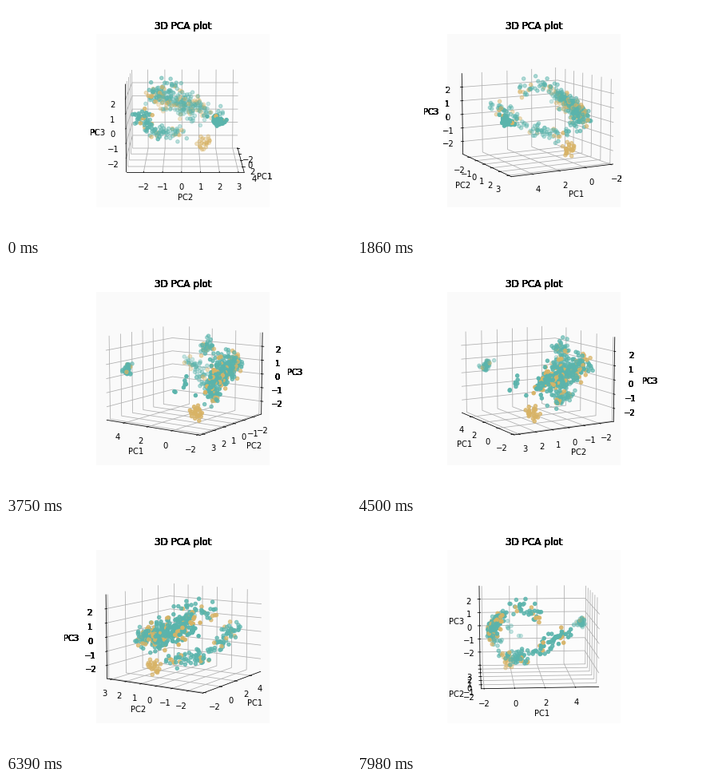
A matplotlib script that plays this animation: 432x288 px, repeating every 8000 ms.

```python
import matplotlib.pyplot as plt
import numpy as np
from matplotlib.animation import FuncAnimation
from matplotlib.artist import Artist
from matplotlib.transforms import Bbox

FRAMES, LOOP = 267, 8000
TEAL, TAN = "#5ab4ac", "#d8b365"
rng = np.random.default_rng(7)
points, colors = [], []


def sweep(n, path, spread, tan):
    """Scatter n points around path(t), a share of them tan."""
    t = rng.random(n)
    centre = np.column_stack([np.broadcast_to(c, n) for c in path(t)])
    points.append(centre + rng.normal(0, 1, (n, 3)) * spread)
    colors.extend(np.where(rng.random(n) < tan, TAN, TEAL))


def shell(t):
    """Curved sheet at the low end of PC1."""
    y = 2.9 * t - 1.5 + rng.normal(0, 0.35, t.size)
    z = 0.55 - 0.35 * y + rng.normal(0, 0.45, t.size)
    x = 0.33 * (z - 0.2) ** 2 - 1.62 + np.abs(rng.normal(0, 0.25, t.size))
    return x, y, z


def lower_arc(t):
    return 3.4 - 4.1 * t, 2.3 * t ** 2 - 2.2, 0.6 - 2.1 * np.sin(1.6 * t)


def upper_arc(t):
    return 1.9 - 2 * t, 1.6 * t - 1.8, 1.4 + 0.8 * np.sin(2 * t)


sweep(280, shell, 0.05, 0.24)
sweep(110, lower_arc, 0.25, 0.13)
sweep(38, upper_arc, 0.25, 0.25)
sweep(48, lambda t: (5.1 - 0.5 * t ** 6, 1.65 + 0.5 * t, 0.75 - 0.55 * t), 0.12, 0.06)
sweep(24, lambda t: (-0.2, 1.3, 0.4 * t - 2.3), 0.22, 1)
sweep(8, lambda t: (0.75 - 1.5 * t, 2.35, 1.7 * t - 0.9), 0.15, 0)

fig = plt.figure(figsize=(6, 4), dpi=72, facecolor="white")
fig.subplots_adjust(left=0.125, right=0.9, bottom=0.125, top=0.88)
ax = fig.add_subplot(projection="3d")
ax.scatter(*np.vstack(points).T, c=colors, s=20)
ax.set(title="3D PCA plot", xlabel="PC1", ylabel="PC2", zlabel="PC3",
       xlim=(-2.18, 5.54), ylim=(-2.92, 3.30), zlim=(-2.95, 2.98),
       xticks=range(-2, 5, 2), yticks=range(-2, 4), zticks=range(-2, 3))
axes3 = (ax.xaxis, ax.yaxis, ax.zaxis)
for axis in axes3:
    axis.set_pane_color((1, 1, 1, 0))
    axis.pane.set_edgecolor((0.93, 0.93, 0.93, 1))


class HardText(Artist):
    """Redraws text outside the axes box so its edges turn solid."""

    def draw(self, renderer):
        box = ax.bbox
        sides = (Bbox([[0, 0], [box.x0, 288]]), Bbox([[box.x1, 0], [432, 288]]))
        for _ in range(12):
            ax.title.draw(renderer)
        for axis in axes3:
            for text in [axis.label] + [t.label1 for t in axis.majorTicks]:
                x = ax.transData.transform(text.get_position())[0]
                if box.x0 + 15 < x < box.x1 - 15:
                    continue
                text.set_clip_on(True)
                text.set_clip_box(sides[int(x > 216)])
                for _ in range(12):
                    text.draw(renderer)
                text.set_clip_on(False)


hard = HardText()
hard.set_zorder(10)
fig.add_artist(hard)


def update(k):
    ax.view_init(elev=10, azim=k)
    ax.set_facecolor(str(0.99 - 0.01 * abs(np.sin(np.radians(2 * k)))))
    return []


anim = FuncAnimation(fig, update, frames=FRAMES, interval=LOOP / FRAMES,
                     init_func=lambda: [], repeat=True, repeat_delay=0, blit=False)
plt.show()
```
